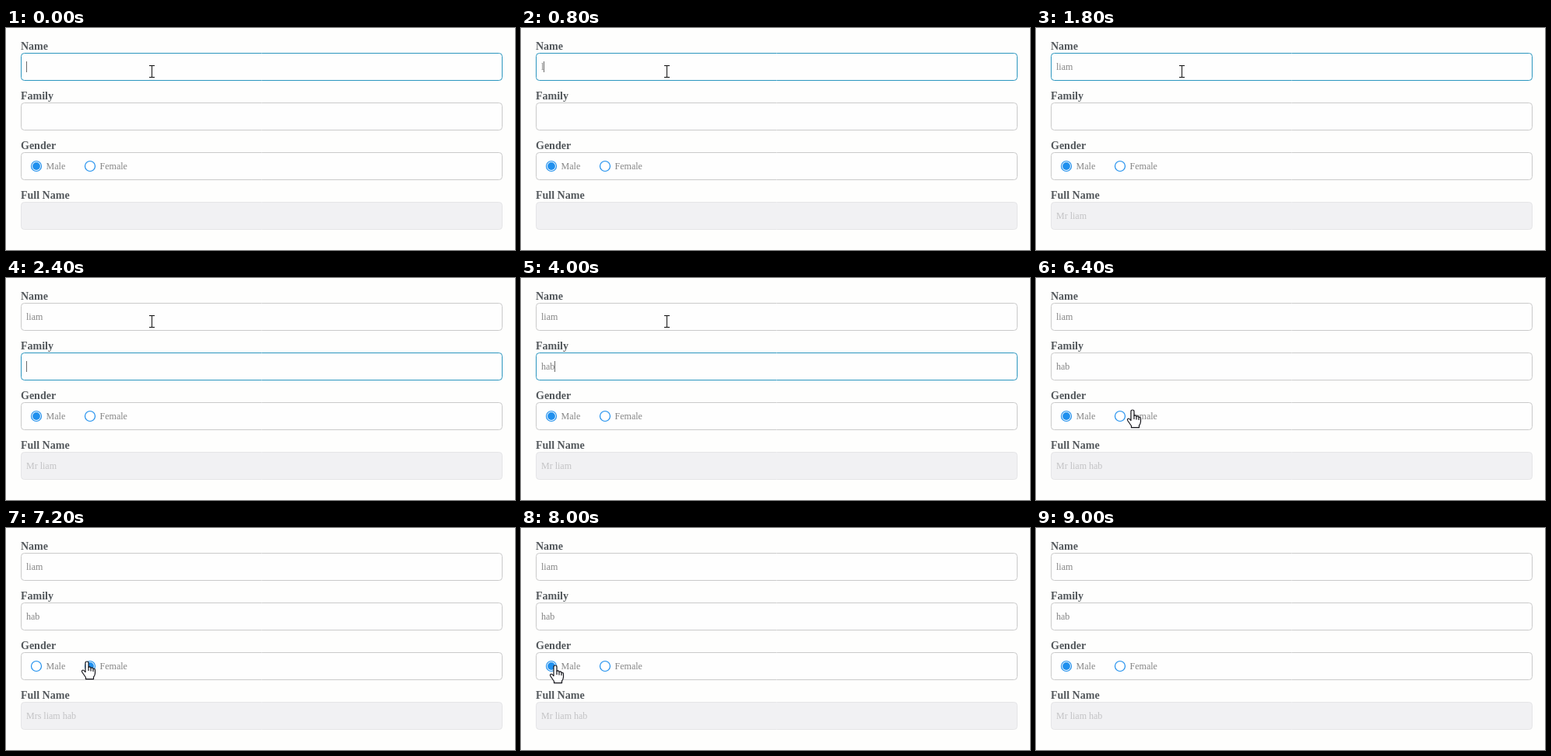
An HTML page with a canvas for the animation above (9.6 s loop, 654x286 px).

```html
<!DOCTYPE html>
<html lang="en">
<head>
<meta charset="utf-8">
<title>Full name form</title>
<style>
  html, body { margin: 0; width: 100%; height: 100%; overflow: hidden; background: #fefefd; }
  canvas { display: block; width: 654px; height: 286px; }
</style>
</head>
<body>
<canvas id="stage"></canvas>
<script>
const W = 654, H = 286, LOOP = 9600, STEP = 200;
const FIRST = 'liam', LAST = 'hab';
const SERIF = '"Liberation Serif", "Times New Roman", serif';
const BLUE = '#2090ee';

const canvas = document.getElementById('stage');
const ctx = canvas.getContext('2d');
const ratio = window.devicePixelRatio || 1;
canvas.width = W * ratio;
canvas.height = H * ratio;

const handShape = new Path2D(
  'M-2 2 Q-2 0 0 0 Q2 0 2 2 V7.5 Q4.5 5.8 5 8.5 Q7.4 6.8 8 9.5 ' +
  'Q10.5 8.5 10.5 11.5 V15 Q10.3 18 8.5 20 V22.7 H-1.5 V20.5 ' +
  'L-6 14 Q-7.4 11.2 -5 11 Q-3.6 11.3 -2 13.6 Z');
const knuckles = new Path2D('M2 7.5 V12 M5 8.5 V12.5 M8 9.5 V13');
const arrowShape = new Path2D('M0.5 0.5 V16.5 L4.2 13 L6.8 18.5 L9 17.5 L6.5 12 H11.5 Z');

// Each entry holds from its time until the next one.
const pointerTrack = [
  [0, 'beam', 187, 56],
  [5600, 'beam', 125, 112],
  [5800, 'beam', 125, 121],
  [6000, 'arrow', 124, 143],
  [6200, 'hand', 124, 168],
  [6400, 'hand', 124, 170],
  [7200, 'hand', 104, 172],
  [7400, 'hand', 66, 175],
  [7600, 'hand', 45, 176],
  [7800, 'hand', 44, 177],
  [8200, 'hand', 46, 178],
  [8400, 'arrow', 62, 185],
  [8600, 'arrow', 98, 211],
  [8800, 'arrow', 137, 238],
  [9000, 'none', 0, 0]
];
const firstKeys = [800, 1000, 1200, 1400];
const lastKeys = [3400, 3600, 4000];
const caretSpans = [[0, 200], [800, 1800], [2400, 3000], [3400, 4600], [5000, 5600], [6000, 6400]];

const within = (t, a, b) => t >= a && t < b;
const typed = (text, keys, t) => text.slice(0, keys.filter(k => t >= k).length);

function fullName(t) {
  if (t < 1800) return '';
  const title = within(t, 7000, 8000) ? 'Mrs' : 'Mr';
  return `${title} ${FIRST}${t >= 4400 ? ' ' + LAST : ''}`;
}

function write(text, x, y, color, font = '12px ') {
  ctx.font = font + SERIF;
  ctx.fillStyle = color;
  ctx.fillText(text, x, y);
}

function field(label, y, border, fill = '#fefefe') {
  write(label, 19, y - 4, '#53585c', 'bold 14px ');
  ctx.beginPath();
  ctx.roundRect(19.5, y + 0.5, 618, 35, 4);
  ctx.fillStyle = fill;
  ctx.fill();
  ctx.lineWidth = 1;
  ctx.strokeStyle = border;
  ctx.stroke();
}

function input(label, y, text, focused, caret) {
  field(label, y, focused ? '#2b96bf' : '#cacaca');
  write(text, 26, y + 22, '#858585');
  if (!focused || !caret) return;
  ctx.fillStyle = '#6c6c6c';
  ctx.fillRect(Math.floor(26 + ctx.measureText(text).width), y + 11, 1, 14);
}

function disc(x, y, r) {
  ctx.beginPath();
  ctx.arc(x, y, r, 0, Math.PI * 2);
}

function radio(label, x, checked) {
  disc(x, 178, 6.5);
  ctx.fillStyle = '#fff';
  ctx.fill();
  ctx.lineWidth = 1.2;
  ctx.strokeStyle = BLUE;
  ctx.stroke();
  if (checked) {
    disc(x, 178, 4.9);
    ctx.fillStyle = BLUE;
    ctx.fill();
  }
  write(label, x + 12.6, 182, '#858585');
}

function outlined(shape) {
  ctx.fillStyle = '#fff';
  ctx.fill(shape);
  ctx.stroke(shape);
}

const pointers = {
  none() {},
  beam() {
    ctx.fillStyle = '#111';
    ctx.fillRect(0, -8, 1, 16);
    for (const y of [-8, 7]) {
      ctx.fillRect(-3, y, 3, 1);
      ctx.fillRect(1, y, 3, 1);
    }
  },
  hand() {
    outlined(handShape);
    ctx.stroke(knuckles);
  },
  arrow() { outlined(arrowShape); }
};

function drawPointer(t) {
  const [, kind, x, y] = pointerTrack.filter(p => t >= p[0]).pop();
  ctx.save();
  ctx.translate(x, y);
  ctx.lineWidth = 1.2;
  ctx.lineJoin = 'round';
  ctx.strokeStyle = '#16161c';
  pointers[kind]();
  ctx.restore();
}

function draw(now) {
  const t = Math.floor((now % LOOP) / STEP) * STEP;
  const caret = caretSpans.some(([a, b]) => within(t, a, b));
  const female = within(t, 6600, 7600);

  ctx.setTransform(ratio, 0, 0, ratio, 0, 0);
  ctx.fillStyle = '#fefefd';
  ctx.fillRect(0, 0, W, H);

  input('Name', 32, typed(FIRST, firstKeys, t), t < 2400, caret);
  input('Family', 96, typed(LAST, lastKeys, t), within(t, 2400, 6400), caret);
  field('Gender', 160, '#cacaca');
  radio('Male', 39, !female);
  radio('Female', 108, female);
  field('Full Name', 224, '#e5e5e7', '#f1f1f3');
  write(fullName(t), 26, 246, '#c3c3c5');
  drawPointer(t);
}

const start = performance.now();
function loop() {
  draw(performance.now() - start);
  requestAnimationFrame(loop);
}
loop();
</script>
</body>
</html>
```
